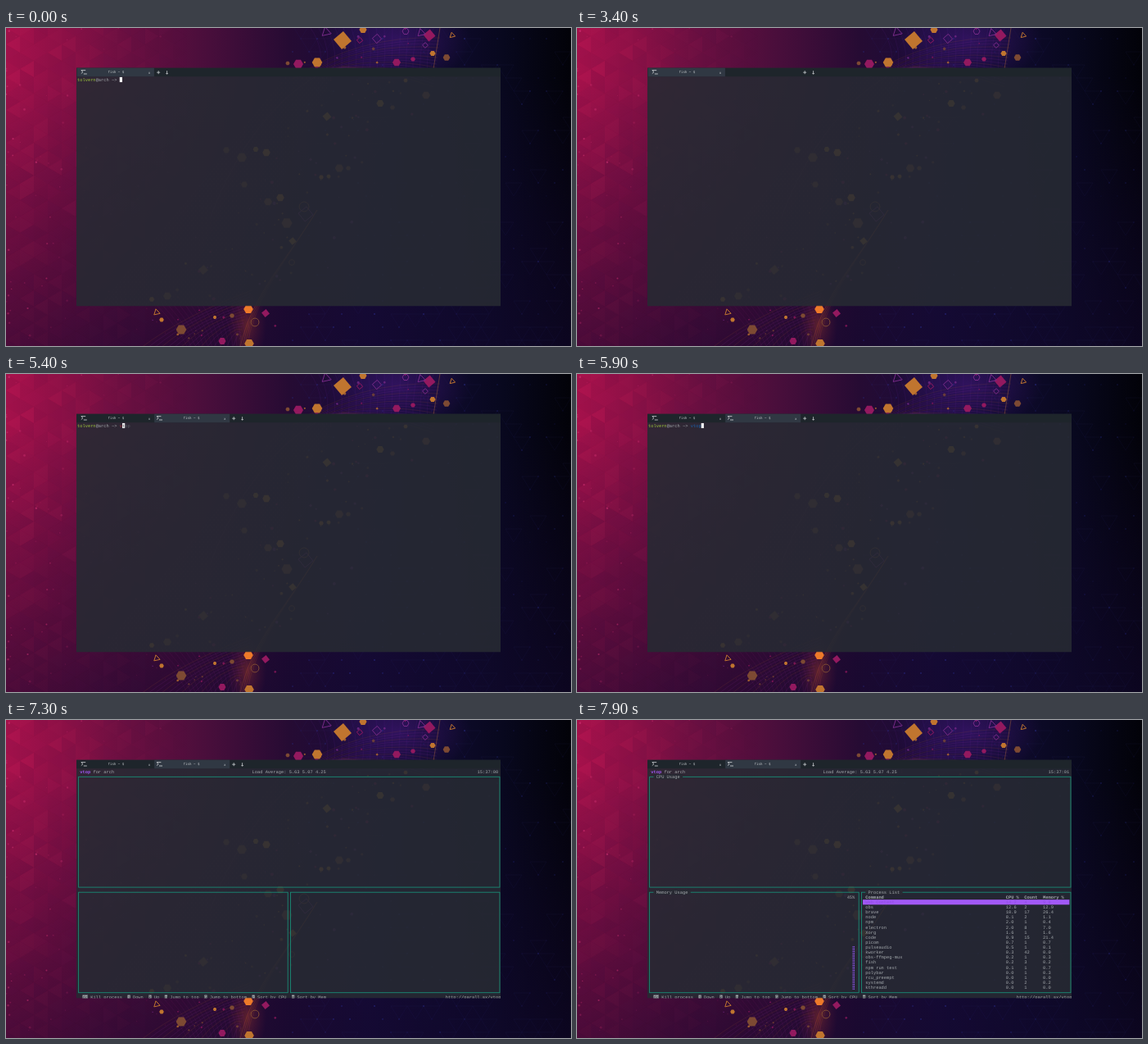
These frames come from a looping animation (690 by 388 pixels, 8000 ms). An HTML page:

```html
<!DOCTYPE html>
<html lang="en">
<head>
<meta charset="utf-8">
<title>Terminal</title>
<style>
  html, body { margin: 0; width: 100%; height: 100%; overflow: hidden; background: #03030c; }
  svg { display: block; width: 100vw; height: 100vh; }
  text { white-space: pre; text-rendering: geometricPrecision; }
  .mono { font: 5.39px "Liberation Mono", monospace; fill: #a3a8ac; }
  .tab { font: 4.15px "DejaVu Sans Mono", monospace; fill: #c3c8cb; }
</style>
</head>
<body>
<svg id="stage" viewBox="0 0 690 388">
  <defs>
    <linearGradient id="sky">
      <stop offset="0" stop-color="#a8124c"/>
      <stop offset=".1" stop-color="#8f1147"/>
      <stop offset=".22" stop-color="#691041"/>
      <stop offset=".36" stop-color="#480e3b"/>
      <stop offset=".5" stop-color="#260b33"/>
      <stop offset=".64" stop-color="#180c3a"/>
      <stop offset=".78" stop-color="#0e0a2b"/>
      <stop offset=".88" stop-color="#08081e"/>
      <stop offset="1" stop-color="#020208"/>
    </linearGradient>
    <linearGradient id="shade" x2="0" y2="1">
      <stop offset=".15" stop-color="#12082e" stop-opacity="0"/>
      <stop offset=".6" stop-color="#12082e" stop-opacity=".36"/>
      <stop offset="1" stop-color="#12082e" stop-opacity=".62"/>
    </linearGradient>
    <radialGradient id="violet">
      <stop offset="0" stop-color="#4c1a86" stop-opacity=".5"/>
      <stop offset="1" stop-color="#4c1a86" stop-opacity="0"/>
    </radialGradient>
    <radialGradient id="ember">
      <stop offset="0" stop-color="#c84a28" stop-opacity=".34"/>
      <stop offset="1" stop-color="#8a2040" stop-opacity="0"/>
    </radialGradient>
    <pattern id="dots" width="5" height="6" patternUnits="userSpaceOnUse">
      <path d="M1 1h1.2M3.5 4h1.2" stroke="#a8386a" stroke-width="1.1"/>
    </pattern>
    <clipPath id="window"><rect x="86" y="48.5" width="518" height="291"/></clipPath>
  </defs>
  <rect width="690" height="388" fill="url(#sky)"/>
  <rect width="690" height="388" fill="url(#shade)"/>
  <ellipse cx="478" cy="14" rx="90" ry="55" fill="url(#violet)"/>
  <ellipse cx="294" cy="362" rx="24" ry="46" fill="url(#ember)"/>
  <path d="M115 339L341 59L400 59Q330 180 285 339Z" fill="url(#dots)" opacity=".22"/>
  <g id="wall"></g>
  <g clip-path="url(#window)">
    <rect x="86" y="48.5" width="518" height="291" fill="#272a33" fill-opacity=".89"/>
    <rect x="86" y="48.5" width="518" height="10.7" fill="#1e252b"/>
    <g id="tabs"></g>
    <g id="shell" class="mono"></g>
    <g id="app" class="mono"></g>
  </g>
</svg>
<script>
const LOOP = 8000, CW = 3.235, RH = 6.125;
const NS = 'http://www.w3.org/2000/svg';
const $ = id => document.getElementById(id);
const col = c => 87 + c * CW;
const row = r => 63 + r * RH;

function add(parent, tag, attrs = {}, text) {
  const el = document.createElementNS(NS, tag);
  for (const k in attrs) el.setAttribute(k, attrs[k]);
  if (text !== undefined) el.textContent = text;
  return parent.appendChild(el);
}
const write = (g, c, r, text, attrs = {}) =>
  add(g, 'text', { x: col(c), y: row(r) + 1.7, ...attrs }, text);
const block = (g, c, r, w, fill) =>
  add(g, 'rect', { x: col(c), y: row(r) - RH / 2, width: w * CW, height: RH, fill });
const show = (el, on) => el.setAttribute('display', on ? 'inline' : 'none');

let seed = 7;
const rnd = () => (seed = seed * 16807 % 2147483647) / 2147483647;

// Wallpaper
const wall = $('wall');
const HUES = { o: '#c0752f', b: '#ee7a2a', d: '#7d4a33', m: '#93195f', p: '#772a88', y: '#b0752e' };

function ngon(x, y, r, n, turn) {
  return Array.from({ length: n }, (_, i) => {
    const a = turn + i * 2 * Math.PI / n;
    return (x + r * Math.cos(a)).toFixed(1) + ',' + (y + r * Math.sin(a)).toFixed(1);
  }).join(' ');
}
const KINDS = { h: [6, 0], s: [4, .08], q: [4, .1], t: [3, .3], c: [12, 0] };

function shape(kind, hue, x, y, r, hollow, opacity = 1) {
  const [n, turn] = KINDS[kind];
  add(wall, 'polygon', {
    points: ngon(x, y, r, n, turn), opacity,
    fill: hollow ? 'none' : HUES[hue], stroke: HUES[hue], 'stroke-width': hollow ? 1 : 0
  });
}

function facets() {
  const w = 17, h = 20;
  for (let i = 0; i < 13; i++) {
    for (let j = -1; j < 40; j++) {
      const x = i * w, y = j * h / 2, right = (i + j) % 2;
      const [a, b] = right ? [x, x + w] : [x + w, x];
      add(wall, 'path', {
        d: `M${a} ${y - h / 2}L${b} ${y}L${a} ${y + h / 2}Z`,
        fill: rnd() < .4 ? '#ff2a6a' : '#30053a',
        opacity: (rnd() * .1 * (1 - i / 14) * (1 - y / 700)).toFixed(3)
      });
    }
  }
  for (let i = 0; i < 90; i++) {
    const x = 230 * rnd() ** 1.6;
    add(wall, 'circle', {
      cx: x, cy: rnd() * 388, r: .5 + rnd() * .9,
      fill: '#e0387c', opacity: (.15 + .4 * rnd()) * (1 - x / 280)
    });
  }
}

function grid() {
  for (let i = 0; i < 18; i++) {
    for (let j = 0; j < 26; j++) {
      const x = 350 + i * 20 + j % 2 * 10, y = j * 16 - 3;
      if (rnd() < .3) {
        add(wall, 'path', { d: `M${x} ${y}l20 0l-10 16z`, fill: 'none', stroke: '#33358c', 'stroke-width': .5, opacity: .16 });
      }
      if (rnd() < .35) {
        add(wall, 'circle', { cx: x, cy: y, r: .6 + rnd() * .5, fill: '#2b2f90', opacity: (.2 + rnd() * .4) * (x > 620 ? .6 : 1) });
      }
    }
  }
}

function mesh() {
  const line = (d, stroke, opacity, width = .5) =>
    add(wall, 'path', { d, fill: 'none', stroke, opacity, 'stroke-width': width });
  for (let i = 0; i < 16; i++) {
    const k = i * 4, hue = i % 3 ? '#8a32a0' : '#b0602c';
    line(`M${350 + k} ${62 - i}Q${430 + k / 2} ${8 + k * .7} ${530 - i / 2} ${12 + k}`, hue, .26);
    line(`M${372 + i * 10} 0Q${392 + i * 8} 30 ${380 + i * 9} 60`, '#6a2ba0', .22);
    line(`M${165 + i * 8} 390Q${215 + i * 5} ${352 + i} ${300 - i} ${320 + k}`, hue, .28);
    line(`M${184 + i * 7} 338Q${210 + i * 6} 365 ${222 + i * 5} 390`, '#8a2b78', .22);
  }
  for (let i = 0; i < 4; i++) {
    line(`M${286 + i * 2.5} 390C${300 + i * 2} 325 342 285 380 222`, '#c8602c', .34 - i * .06, .8);
  }
  line('M250 230C280 150 330 78 400 48', '#a04a70', .3, .6);
  line('M530 0L522 50', '#b8703a', .4, 1);
}

// kind + hue, x, y, radius
const SOLIDS = [
  ['so', 411, 15, 11], ['ho', 380, 42, 6.3], ['hm', 357, 44, 6], ['ho', 436, 2, 4.6],
  ['qm', 517, 9, 7.5], ['hm', 477, 42, 5], ['ho', 521, 31, 3.6], ['hd', 538, 36, 4.4],
  ['hm', 497, 38, 3], ['hd', 344, 43, 2.6], ['ho', 190, 356, 2.8], ['hd', 214, 368, 6.4],
  ['hb', 296, 343, 5.8], ['ho', 297, 385, 5.8], ['qm', 317, 348, 5], ['hm', 264, 382, 4.5],
  ['ho', 255, 353, 2.2], ['hd', 276, 351, 3], ['hy', 457, 92, 4.6], ['qy', 392, 108, 5.4],
  ['ho', 488, 64, 2.6], ['hd', 513, 82, 5], ['hd', 472, 97, 3], ['ho', 318, 152, 4.8],
  ['hy', 305, 148, 3.4], ['hd', 288, 158, 6], ['ho', 335, 207, 4.8], ['ho', 385, 182, 2.8],
  ['hy', 394, 181, 2.6], ['hd', 407, 171, 5.2], ['hd', 418, 171, 3], ['sy', 350, 260, 4.8],
  ['hd', 343, 238, 6.6], ['qd', 241, 295, 6], ['ho', 178, 331, 3.2], ['hd', 197, 327, 5],
  ['hd', 320, 212, 5], ['hd', 291, 191, 4], ['hd', 269, 149, 4]
];
const RINGS = [
  ['tp', 391, 5, 6.5], ['sp', 453, 13, 5.6], ['qm', 432, 15, 3.6], ['tp', 507, 6, 5.5],
  ['to', 545, 9, 3.8], ['hp', 488, 4, 4], ['sp', 512, 21, 3.4], ['to', 184, 347, 4.3],
  ['cd', 304, 359, 5], ['cd', 349, 286, 3.4], ['qp', 366, 227, 9], ['cd', 364, 218, 6]
];

facets();
grid();
mesh();
for (const [[k, h], x, y, r] of SOLIDS) shape(k, h, x, y, r);
for (const [[k, h], x, y, r] of RINGS) shape(k, h, x, y, r, true);
for (let i = 0; i < 110; i++) {
  const u = rnd(), y = u * 388;
  const x = 465 - 220 * u + (rnd() + rnd() - 1) * 100;
  shape('hsc'[i % 3], 'omdp'[i % 4], x, y, .6 + rnd() * 1.5, false, .75);
}

// Tabs
function makeTab(x, w, left = x) {
  const g = add($('tabs'), 'g');
  const back = add(g, 'rect', { x: left, y: 48.5, width: w, height: 10.7, fill: '#303843' });
  add(g, 'path', {
    d: `M${x + 5} 51.6h5.4M${x + 5} 51.6l2.2 2l-2.2 2M${x + 8} 56h4`,
    fill: 'none', stroke: '#d5d9db', 'stroke-width': .8
  });
  add(g, 'text', { x: x + 37.6, y: 55.4, class: 'tab' }, 'fish ~ $');
  add(g, 'text', { x: x + 87, y: 55.7, class: 'tab' }, 'x');
  return { g, back };
}
const tab1 = makeTab(86.8, 94.4, 86.5);
const tab2 = makeTab(179, 92, 181.2);
const tools = add($('tabs'), 'path', {
  d: 'M184.2 54.2h4M186.2 52.2v4M196.6 52.2v4M195.4 55l1.2 1.3l1.2 -1.3',
  fill: 'none', stroke: '#d5d9db', 'stroke-width': .75
});

// Shell
const shell = $('shell');
const prompt = add(shell, 'g');
write(prompt, 0, 0, 'tolvern', { fill: '#9cc83c' });
write(prompt, 7, 0, '@arch ~>');
const typed = write(prompt, 16, 0, '');
const hint = write(prompt, 16, 0, '', { fill: '#5a5f66' });
const cursor = block(shell, 0, 0, 1, '#f4f5f5');
const under = write(shell, 0, 0, '', { fill: '#30343a' });

// Process viewer
const app = $('app'), TEAL = '#199078', VIOLET = '#a259f7';
const frame = (c1, r1, c2, r2) => add(app, 'rect', {
  x: col(c1 + .5), y: row(r1) + .2, width: (c2 - c1) * CW, height: (r2 - r1) * RH,
  fill: 'none', stroke: TEAL, 'stroke-width': .85
});
write(app, 1, 0, 'vtop', { fill: VIOLET, 'font-weight': 'bold' });
write(app, 6, 0, 'for arch');
write(app, 66, 0, 'Load Average: 5.63 5.07 4.25');
const clock = write(app, 151, 0, '');
frame(0, 1, 159, 23);
frame(0, 24, 79, 44);
frame(80, 24, 159, 44);

const KEYS = [[2, 'dd', 'Kill process'], [19, 'j', 'Down'], [27, 'k', 'Up'], [33, 'g', 'Jump to top'],
  [48, 'G', 'Jump to bottom'], [66, 'c', 'Sort by CPU'], [81, 'm', 'Sort by Mem']];
for (const [c, key, label] of KEYS) {
  block(app, c, 45, key.length, '#a3a8ac');
  write(app, c, 45, key, { fill: '#262a32' });
  write(app, c + key.length + 1, 45, label);
}
write(app, 139, 45, 'http://parall.ax/vtop');

const stats = add(app, 'g');
for (const [c, r, title] of [[3, 1, 'CPU Usage'], [3, 24, 'Memory Usage'], [83, 24, 'Process List']]) {
  block(stats, c - 1, r, title.length + 2, '#282a33');
  write(stats, c, r, title);
}
write(stats, 75, 25, '45%');
for (const dx of [.9, 2.4]) {
  add(stats, 'path', {
    d: `M${col(77) + dx} 276v53`, stroke: '#8650dd', 'stroke-width': 1.1, 'stroke-dasharray': '1 .53'
  });
}
const line = (r, cells, attrs) =>
  cells.forEach((s, i) => write(stats, [82, 135, 142, 149][i], r, s, attrs));
line(25, ['Command', 'CPU %', 'Count', 'Memory %'], { 'font-weight': 'bold' });
block(stats, 81, 26, 78, VIOLET);
line(26, ['Web Content', '14.2', '4', '9.8'], { fill: '#8f4ce4' });
`obs 12.6 2 12.9
brave 10.9 17 26.4
node 8.1 2 1.1
npm 2.0 1 0.4
electron 2.0 8 7.0
Xorg 1.6 1 1.6
code 0.9 15 21.4
picom 0.7 1 0.7
pulseaudio 0.5 1 0.1
kworker 0.3 42 0.0
obs-ffmpeg-mux 0.2 1 0.3
fish 0.2 3 0.2
npm run test 0.1 1 0.7
polybar 0.0 1 0.3
rcu_preempt 0.0 1 0.0
systemd 0.0 2 0.2
kthreadd 0.0 1 0.0`.split('\n').forEach((s, i) => line(27 + i, s.match(/^(.+) (\S+) (\S+) (\S+)$/).slice(1)));

// Timeline
const OPEN = 3400, SWITCH = 3600, READY = 3800, ENTER = 6200, CLEAR = 7100, DRAW = 7300, STATS = 7800;
const STROKES = [5400, 5700, 5800, 5900];
const CMD = 'vtop';

function update(t) {
  const opened = t >= OPEN, switched = t >= SWITCH;
  show(tab1.back, !switched);
  show(tab2.g, switched);
  tools.setAttribute('transform', `translate(${opened ? 92 : 0} 0)`);

  const ready = t < OPEN || t >= READY;
  show(shell, ready && t < CLEAR);
  const n = STROKES.filter(s => t >= s).length, entered = t >= ENTER;
  typed.textContent = CMD.slice(0, n);
  typed.setAttribute('fill', n === CMD.length ? '#1c62ac' : '#a8323c');
  hint.textContent = n ? CMD.slice(n) : '';
  hint.setAttribute('x', col(16 + n));
  const c = entered ? 0 : 16 + n;
  cursor.setAttribute('x', col(c));
  cursor.setAttribute('y', row(entered ? 1 : 0) - RH / 2);
  under.textContent = n && !entered ? CMD.charAt(n) : '';
  under.setAttribute('x', col(c));

  show(app, t >= DRAW);
  show(stats, t >= STATS);
  clock.textContent = t < STATS ? '15:37:00' : '15:37:01';
}

const start = performance.now();
function tick() {
  update((performance.now() - start) % LOOP);
  requestAnimationFrame(tick);
}
tick();
</script>
</body>
</html>
```
